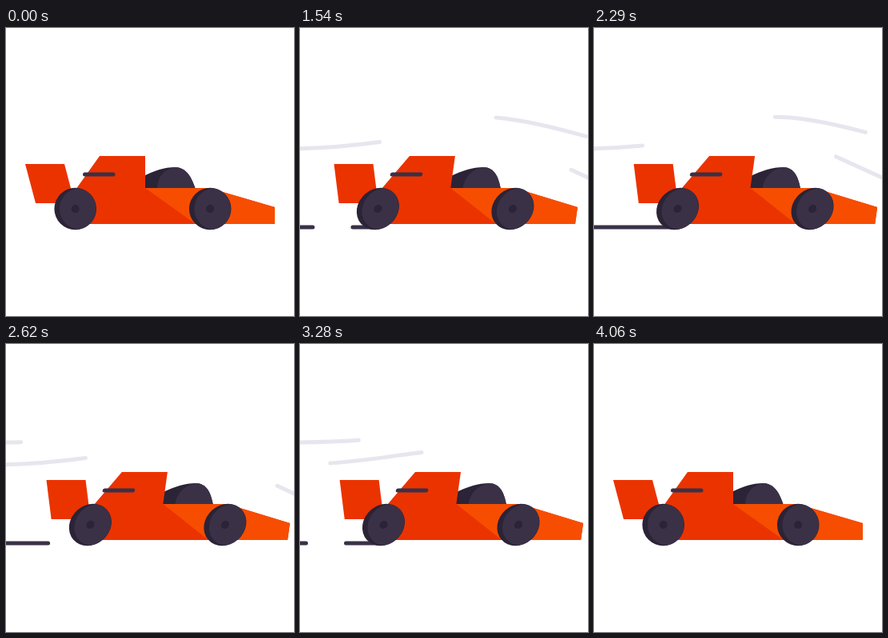
Animation of 360x360 px, one loop 4090 ms. Source, as an HTML page with a canvas:

```html
<!DOCTYPE html>
<html lang="en">
<head>
<meta charset="utf-8">
<title>Racing car</title>
<style>
  html, body { margin: 0; width: 100%; height: 100%; overflow: hidden; background: #fff; }
  canvas { display: block; }
</style>
</head>
<body>
<canvas id="stage" width="360" height="360"></canvas>
<script>
const ctx = document.getElementById('stage').getContext('2d');
const LOOP = 4090, START = 1030, GROUND = 245;
const RED = '#eb3300', ORANGE = '#f74d00', DARK = '#2b2336', SLATE = '#3a3147', WIND = '#e8e5ee';

const shapes = [
  [DARK, 'M170 202V186C186 178 198 174 211 174C225 174 232 186 237 202Z'],
  [SLATE, 'M189 202C189 186 197 177 211 174C225 174 232 186 237 202Z'],
  [RED, 'M24 170H73L82 204L85 219H37Z'],
  [RED, 'M117 160H174V200H254L336 224V245H100L87 202Z'],
  [ORANGE, 'M174 200H254L336 224V245H237Z']
].map(([color, d]) => [color, new Path2D(d)]);
const tyreFace = new Path2D('M3 -25.8A26 26 0 0 1 3 25.8A26 26 0 0 1 3 -25.8Z');

// Air streams: a curve and the times at which gusts enter it
const GUST = 115, WIND_SPEED = 0.98;
const streams = [
  ['M380 196L268 145C238 132 200 131 156 135C110 140 60 151 -20 151',
    [1124, 1495, 1834, 2204, 2575, 2918, 3320]],
  ['M390 145C340 130 290 116 246 112C190 108 120 118 76 120C50 122 20 123 -20 123',
    [1389, 2120, 2836]]
].map(([d, times]) => [new Path2D(d), times]);

const clamp = u => Math.min(1, Math.max(0, u));
const ramp = (t, a, b) => clamp((t - a) / (b - a));
const smooth = u => u * u * (3 - 2 * u);

function stroke(path, color) {
  ctx.strokeStyle = color;
  ctx.lineWidth = 5;
  ctx.lineCap = 'round';
  ctx.stroke(path);
}

function line(x1, x2, y, color) {
  const path = new Path2D();
  path.moveTo(x1, y);
  path.lineTo(x2, y);
  stroke(path, color);
}

function drawWind(t) {
  for (const [path, times] of streams) {
    for (const start of times) {
      const head = (t - start) * WIND_SPEED;
      if (head <= 0) continue;
      ctx.setLineDash([GUST, 2000]);
      ctx.lineDashOffset = GUST - head;
      if (head < 700) stroke(path, WIND);
    }
  }
  ctx.setLineDash([]);
}

function drawSkid(t, wheelX) {
  const speed = 0.529, pitch = 304, gap = 50;
  if (t < START) return;
  for (let i = 0; i < 5; i++) {
    const x = 58 - speed * (t - 3280) - pitch * i;
    const left = Math.max(x, 87 - speed * (t - START), -20);
    const right = Math.min(x + pitch - gap, wheelX);
    if (left < right) line(left, right, 249, SLATE);
  }
}

function drawWheel(x) {
  ctx.save();
  ctx.translate(x, 226);
  const disc = (r, color) => {
    ctx.fillStyle = color;
    ctx.beginPath();
    ctx.arc(0, 0, r, 0, Math.PI * 2);
    ctx.fill();
  };
  disc(26.3, DARK);
  ctx.fillStyle = SLATE;
  ctx.fill(tyreFace);
  disc(5, DARK);
  ctx.restore();
}

function drawCar(shift, lean) {
  ctx.save();
  ctx.transform(1, 0, -lean, 1, shift + lean * GROUND, 0);
  for (const [color, path] of shapes) {
    ctx.fillStyle = color;
    ctx.fill(path);
  }
  line(98.5, 134, 183, SLATE);
  drawWheel(86.7);
  drawWheel(255.2);
  ctx.restore();
}

function draw(now) {
  const t = now % LOOP;
  const out = Math.sin(ramp(t, START - 30, 2620) * Math.PI / 2);
  const shift = 16 * out * (1 - smooth(ramp(t, 3150, 4060)));
  const lean = 0.14 * smooth(ramp(t, START - 10, 1480)) * (1 - smooth(ramp(t, 3400, 4040)));
  ctx.fillStyle = '#fff';
  ctx.fillRect(0, 0, 360, 360);
  drawWind(t);
  drawSkid(t, 87 + shift);
  drawCar(shift, lean);
}

const origin = performance.now();
function tick() {
  draw(performance.now() - origin);
  requestAnimationFrame(tick);
}
tick();
</script>
</body>
</html>
```
